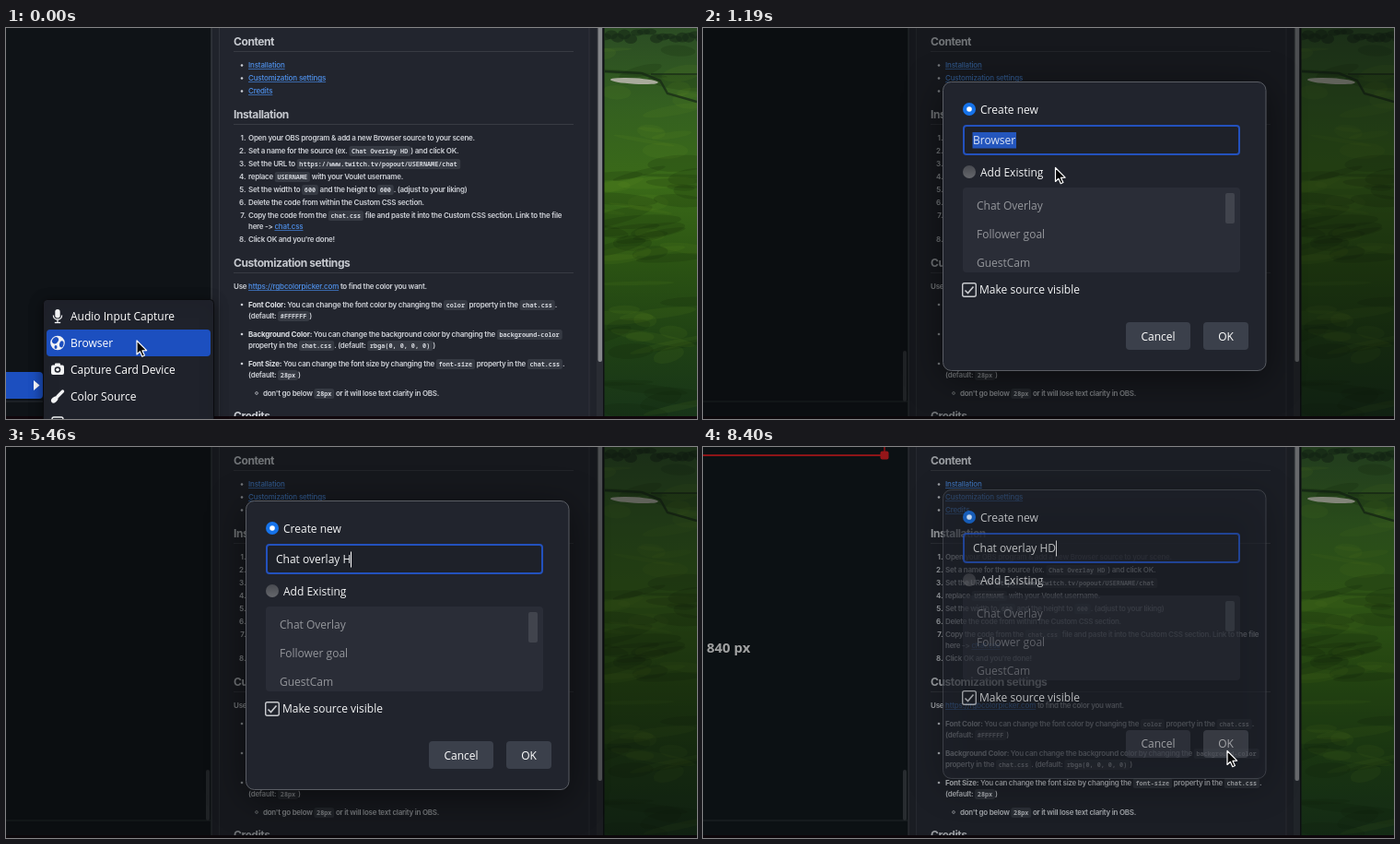
Recreate the animation shown at these times as an HTML page with a canvas. Size 750 by 424 pixels, loop 8470 ms.

```html
<!DOCTYPE html>
<html lang="en">
<head>
<meta charset="utf-8">
<title>Adding a browser source</title>
<style>
html, body { margin: 0; width: 100%; height: 100%; overflow: hidden; background: #0e1216; }
canvas { display: block; width: 750px; height: 424px; }
</style>
</head>
<body>
<canvas id="stage" width="750" height="424"></canvas>
<script>
const ctx = document.getElementById('stage').getContext('2d');
const W = 750, H = 424, LOOP = 8470, STEP = 70;
const UI = '"Open Sans", "Noto Sans", sans-serif';
const DOC = 'Inter, Roboto, sans-serif';
const MONO = '"Noto Sans Mono", "DejaVu Sans Mono", monospace';
const BLUE = '#1c4fbf', INK = '#f2f3f5', BODY = '#ced1d7';

const clamp = v => Math.max(0, Math.min(1, v));
const span = (t, a, b) => clamp((t - a) / (b - a));
const ease = p => (1 - Math.cos(Math.PI * p)) / 2;
const mix = (a, b, p) => a + (b - a) * p;

function seeded(seed) {
  return () => (seed = seed * 16807 % 2147483647) / 2147483647;
}
function rect(x, y, w, h, fill) {
  ctx.fillStyle = fill;
  ctx.fillRect(x, y, w, h);
}
function box(x, y, w, h, r, fill, stroke, lw = 1) {
  ctx.beginPath();
  ctx.roundRect(x, y, w, h, r);
  if (fill) { ctx.fillStyle = fill; ctx.fill(); }
  if (stroke) { ctx.strokeStyle = stroke; ctx.lineWidth = lw; ctx.stroke(); }
}
function oval(x, y, rx, ry, turn, fill) {
  ctx.beginPath();
  ctx.ellipse(x, y, rx, ry, turn, 0, 7);
  ctx.fillStyle = fill;
  ctx.fill();
}
const disc = (x, y, r, fill) => oval(x, y, r, r, 0, fill);
function line(stroke, lw, ...points) {
  ctx.beginPath();
  points.forEach(p => ctx.lineTo(...p));
  ctx.strokeStyle = stroke;
  ctx.lineWidth = lw;
  ctx.stroke();
}
function poly(fill, ...points) {
  ctx.beginPath();
  points.forEach(p => ctx.lineTo(...p));
  ctx.closePath();
  ctx.fillStyle = fill;
  ctx.fill();
}
function shade(y0, y1, colors) {
  const g = ctx.createLinearGradient(0, y0, 0, y1);
  colors.forEach((c, i) => g.addColorStop(i / (colors.length - 1), c));
  return g;
}
function shadow(color, blur, dy) {
  ctx.shadowColor = color;
  ctx.shadowBlur = blur;
  ctx.shadowOffsetY = dy;
}
function label(str, x, y, font, fill, align = 'left', spacing = 0) {
  ctx.font = font;
  ctx.letterSpacing = spacing + 'px';
  ctx.textAlign = align;
  ctx.fillStyle = fill;
  ctx.fillText(str, x, y);
  return ctx.measureText(str).width;
}
const ui = (str, x, y, fill = '#f4f5f6', align) => label(str, x, y, '500 12px ' + UI, fill, align);
const doc = (str, x, y, weight, fill, spacing) =>
  label(str, x, y, `${weight} 8px ${DOC}`, fill, 'left', spacing);

// Inline markup: `code`, *bold*, [link]
function rich(str, x, y) {
  for (const part of str.match(/`[^`]+`|\*[^*]+\*|\[[^\]]+\]|[^`*\[]+/g)) {
    const mark = part[0], inner = part.slice(1, -1);
    if (mark === '`') {
      const w = inner.length * 4.1;
      box(x, y - 8, w + 5.4, 11, 2.5, '#363a43');
      label(inner, x + 2.7, y, '600 6.8px ' + MONO, '#d3d6dc');
      x += w + 5.4;
    } else if (mark === '[') {
      const w = doc(inner, x, y, 500, '#4f92ee', -0.16);
      rect(x, y + 1, w, 0.8, '#3f78c8');
      x += w;
    } else if (mark === '*') {
      x += doc(inner, x, y, 700, '#dcdfe4', -0.22);
    } else {
      x += doc(part, x, y, 600, BODY, -0.26);
    }
  }
}
function heading(str, y) {
  label(str, 247, y, '700 12px ' + DOC, '#c6c9cf', 'left', -0.42);
  rect(247, y + 6, 369, 1, '#383b43');
}

function drawDoc() {
  rect(223, 0, 426, H, '#20232b');
  rect(231, 0, 402, H, '#22252e');
  rect(222.5, 0, 1, H, '#41444a');
  rect(231, 0, 1, H, '#30333b');
  rect(632.5, 0, 1, H, '#30333b');
  rect(641, 0, 8, H, '#292c33');
  rect(648, 0, 1.5, H, '#0f1114');
  box(642.5, -10, 4.5, 372, 2, '#85878b');

  heading('Content', 19);
  ['Installation', 'Customization settings', 'Credits'].forEach((s, i) => {
    disc(256, 40.5 + 14 * i, 1.3, BODY);
    rich('[' + s + ']', 263, 43 + 14 * i);
  });

  heading('Installation', 98);
  [
    'Open your OBS program & add a new Browser source to your scene.',
    'Set a name for the source (ex. `Chat Overlay HD`) and click OK.',
    'Set the URL to `https://www.twitch.tv/popout/USERNAME/chat`',
    'replace `USERNAME` with your Voulet username.',
    'Set the width to `600` and the height to `600`. (adjust to your liking)',
    'Delete the code from within the Custom CSS section.',
    'Copy the code from the `chat.css` file and paste it into the Custom CSS section. Link to the file',
    "Click OK and you're done!"
  ].forEach((s, i) => {
    const y = 122 + 14 * i + (i === 7 ? 12 : 0);
    label(i + 1 + '.', 260.5, y, '600 8px ' + DOC, BODY, 'right');
    rich(s, 263, y);
  });
  rich('here -> [chat.css]', 263, 218);

  heading('Customization settings', 259);
  rich('Use [https://rgbcolorpicker.com] to find the color you want.', 247, 283);
  [
    ['*Font Color:* You can change the font color by changing the `color` property in the `chat.css`.',
      '(default: `#FFFFFF`)'],
    ['*Background Color:* You can change the background color by changing the `background-color`',
      'property in the `chat.css`. (default: `rbga(0, 0, 0, 0)`)'],
    ['*Font Size:* You can change the font size by changing the `font-size` property in the `chat.css`.',
      '(default: `28px`)']
  ].forEach((pair, i) => {
    const y = 303 + 32 * i;
    disc(256, y - 3, 1.3, BODY);
    pair.forEach((s, k) => rich(s, 263, y + 12 * k));
  });
  box(270.6, 394.6, 2.8, 2.8, 1.4, null, BODY, 0.7);
  rich("don't go below `28px` or it will lose text clarity in OBS.", 279, 399);
  heading('Credits', 425);
}

// Meadow: soft gradient, seeded patches of grass, trees and a trail
function drawField() {
  const rnd = seeded(11);
  ctx.save();
  ctx.beginPath();
  ctx.rect(649.5, 0, 101, H);
  ctx.clip();
  rect(649, 0, 101, H, shade(0, H, ['#2b4c24', '#346020', '#3a6a18', '#2b5313', '#1f4114', '#183419']));
  for (let i = 0; i < 70; i++) {
    const fill = i % 2 ? 'rgba(12,30,8,.17)' : 'rgba(110,150,40,.09)';
    oval(649 + rnd() * 101, 20 + rnd() * 400, 12 + rnd() * 35, 2 + rnd() * 7, rnd() * 0.5 - 0.3, fill);
  }
  for (let i = 0; i < 16; i++) oval(650 + i * 7, 4 + rnd() * 8, 7, 3 + rnd() * 3, 0, 'rgba(22,42,22,.6)');
  line('rgba(20,38,20,.7)', 2.5, [650, 47], [690, 49], [710, 57], [718, 71], [750, 80]);
  line('rgba(20,38,20,.6)', 2, [700, 50], [750, 50]);
  oval(682, 57.5, 26, 3.2, 0.06, '#a9ab9c');
  ctx.restore();
}

function drawDesk(t) {
  rect(0, 0, W, H, '#0f1317');
  rect(0, 404.5, 222, 1, '#2b2f34');
  box(217, 350, 4, 55, 2, '#33373c');
  drawDoc();
  drawField();
  rect(0, 421, W, 3, '#10070c');
}

// Preview outline of the newly added source
function drawPreview() {
  rect(0, 8, 198, 2, '#b8181c');
  rect(196, 0, 2, 10, '#8e1518');
  box(192.5, 4.5, 9, 9, 2, '#c01a1e');
  label('840 px', 4, 223, '700 15px ' + UI, '#d0d0d0');
}

function drawMic(x, y) {
  box(x - 2.7, y - 7.5, 5.4, 9.5, 2.7, INK);
  ctx.beginPath();
  ctx.arc(x, y - 1, 4.6, 0, Math.PI);
  ctx.lineWidth = 1.3;
  ctx.strokeStyle = INK;
  ctx.stroke();
  line(INK, 1.3, [x, y + 3.5], [x, y + 7]);
  line(INK, 1.3, [x - 3.2, y + 7], [x + 3.2, y + 7]);
}
function drawGlobe(x, y) {
  disc(x, y, 7.8, INK);
  oval(x - 2.5, y - 2.8, 3, 4, 0.7, BLUE);
  oval(x + 4.3, y + 1.3, 2.2, 3.6, 0.2, BLUE);
  oval(x - 2, y + 4.5, 1.5, 2, 0, BLUE);
}
function drawCamera(x, y) {
  box(x - 7, y - 5, 14, 10.5, 2, INK);
  box(x - 3, y - 7, 6, 4, 1, INK);
  disc(x, y, 3.3, '#1f222b');
  disc(x, y, 1.8, INK);
}
function drawBrush(x, y) {
  ctx.lineCap = 'round';
  line(INK, 3.4, [x + 5.5, y - 5.5], [x, y]);
  ctx.lineCap = 'butt';
  oval(x - 3.3, y + 3.5, 4.2, 2.8, -0.7, INK);
}

function drawMenu(alpha) {
  ctx.save();
  ctx.globalAlpha = alpha;
  box(-6, 373, 46, 29, 4, BLUE);
  poly('#fff', [30, 382], [36.5, 387.5], [30, 393]);
  shadow('rgba(0,0,0,.5)', 14, 3);
  box(40.5, 294.5, 185, 140, 4, '#1f222b', '#0a0b0e');
  shadow('transparent', 0, 0);
  box(44, 327, 178, 29, 4, BLUE);
  ['Audio Input Capture', 'Browser', 'Capture Card Device', 'Color Source']
    .forEach((s, i) => ui(s, 70, 317 + 29 * i, '#fff'));
  [drawMic, drawGlobe, drawCamera, drawBrush].forEach((icon, i) => icon(56, 312.5 + 29 * i));
  box(50, 422, 12, 10, 2, null, INK, 1.3);
  ctx.restore();
}

// The name is typed in bursts with a steady rhythm inside each
const BURSTS = [[2870, 'Chat '], [3850, 'over'], [4690, 'lay '], [5460, 'HD']];
const typedAt = t => BURSTS.map(([t0, s]) => t < t0 ? '' : s.slice(0, 1 + Math.floor((t - t0) / 145))).join('');

function drawName(t) {
  const typed = typedAt(t);
  if (!typed) {
    rect(292.5, 113, 47.5, 17.5, '#2456bd');
    ui('Browser', 293, 126, '#d9e2f3');
    return;
  }
  const w = ui(typed, 293, 126);
  const caret = t < 6580 || (t >= 7070 && t < 7560) || t >= 8190;
  if (caret) rect(Math.round(293 + w), 113.5, 1, 17, '#fff');
}

function button(str, x, w, fill) {
  box(x, 319, w, 30, 4, fill);
  ui(str, x + w / 2, 338.5, '#fff', 'center');
}

function drawDialog(t, alpha, dy) {
  ctx.save();
  ctx.translate(0, dy);
  ctx.globalAlpha = alpha * alpha;
  shadow('rgba(0,0,0,.5)', 38, 8);
  box(260.5, 58.5, 350.5, 313, 9, '#21242d');
  shadow('transparent', 0, 0);
  box(260.5, 58.5, 350.5, 313, 9, null, '#5a5d64');
  box(282, 173, 301, 92, 4, '#2a2d37');
  box(567, 179, 10, 33, 2, '#41444d');
  disc(289, 156, 7, shade(149, 163, ['#484a50', '#65676c']));
  ['Chat Overlay', 'Follower goal', 'GuestCam'].forEach((s, i) => ui(s, 297, 197 + 31 * i, '#94969b'));
  button('Cancel', 459, 70, '#3b404b');
  button('OK', 543, 49, t >= 7630 ? '#50545d' : '#3b404b');

  ctx.globalAlpha = alpha;
  disc(289, 88, 7, '#1673ea');
  disc(289, 88, 2.8, '#fff');
  ui('Create new', 301, 93);
  box(283, 106, 299, 31, 3, '#1e2129', '#2351bd', 2);
  drawName(t);
  ui('Add Existing', 301, 161);
  box(281.7, 276.7, 14.6, 14.6, 2, null, '#c9cbcf', 1.4);
  line('#c9cbcf', 1.6, [284.5, 284.5], [287.5, 287.5], [293.5, 280.5]);
  ui('Make source visible', 300, 288);
  ctx.restore();
}

// Pointer stops: departure, arrival, place
const STOPS = [
  [0, 0, 142, 339],
  [560, 840, 323, 178],
  [980, 1190, 382.5, 151.5],
  [7000, 7700, 565, 319],
  [7770, 7980, 569, 329.5]
];
function drawPointer(t) {
  if (t >= 2870 && t < 7070) return;
  let x = 0, y = 0;
  for (const [t0, t1, px, py] of STOPS) {
    const p = t1 ? ease(span(t, t0, t1)) : 1;
    x = mix(x, px, p);
    y = mix(y, py, p);
  }
  ctx.save();
  ctx.translate(x, y);
  ctx.lineJoin = 'round';
  poly('#050505', [0, 0], [0, 15], [3.4, 11.8], [5.8, 17.2], [8.4, 16], [6, 10.9], [10.6, 10.7]);
  ctx.strokeStyle = '#fff';
  ctx.lineWidth = 1.2;
  ctx.stroke();
  ctx.restore();
}

function draw(t) {
  const out = span(t, 8120, 8470);
  drawDesk();
  if (t >= 8330) drawPreview();
  const menu = 1 - span(t, 210, 420);
  if (menu > 0) drawMenu(menu);
  const dim = 0.45 * span(t, 280, 770) * (1 - 0.6 * out);
  rect(0, 0, W, H, `rgba(8,9,11,${dim})`);
  const alpha = span(t, 280, 560) * (1 - 0.33 * out);
  const dy = -20.5 * (1 - ease(span(t, 350, 840))) - 13.3 * ease(out);
  if (alpha > 0) drawDialog(t, alpha, dy);
  drawPointer(t);
}

let last = -1;
function tick(now) {
  const t = Math.floor((now % LOOP) / STEP) * STEP;
  if (t !== last) draw(last = t);
  requestAnimationFrame(tick);
}
draw(0);
requestAnimationFrame(tick);
</script>
</body>
</html>
```
